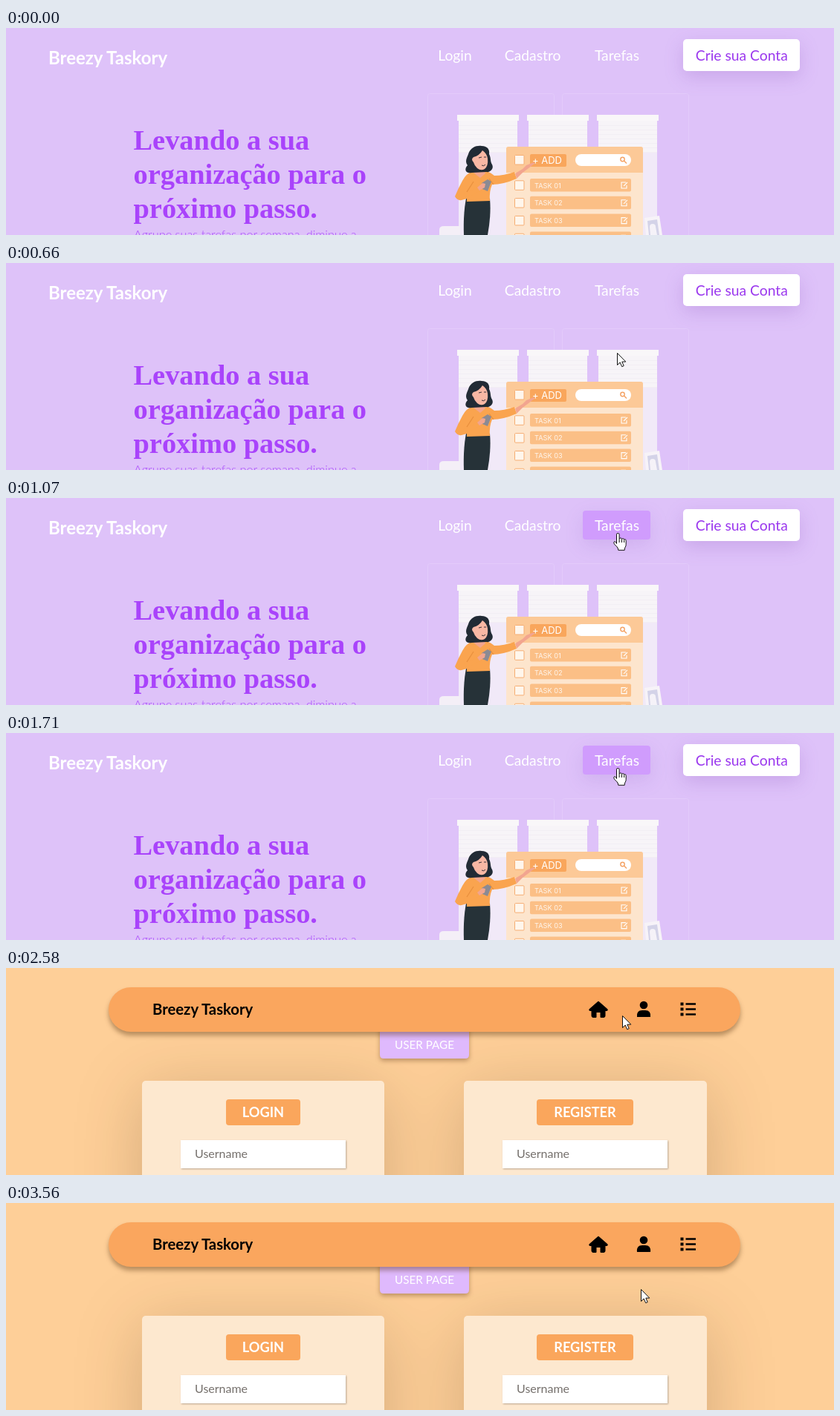
An HTML page that plays this animation: 1114x279 px, repeating every 3630 ms.

```html
<!DOCTYPE html>
<html lang="pt">
<head>
<meta charset="utf-8">
<title>Breezy Taskory</title>
<style>
  html, body { margin: 0; width: 100%; height: 100%; overflow: hidden; background: #dec2f9; }
  svg { display: block; font-family: Lato, sans-serif; }
  .mid { text-anchor: middle; }
  .brand { font-weight: 700; }
  .nav text { font-size: 19.3px; fill: #fff; }
  .nav .cta { fill: #9b38ee; }
  .ctaBox { filter: drop-shadow(0 8px 12px rgba(110, 50, 170, .19)); }
  #hover { filter: drop-shadow(0 8px 12px rgba(110, 50, 170, .12)); }
  .hero { font: 700 38.4px "Liberation Serif", serif; fill: #a943fb; }
  .lead { font-size: 16.3px; font-weight: 300; fill: #a94dfb; }
  .board { font-family: Inter, sans-serif; fill: #fff; }
  .bar { filter: drop-shadow(0 5px 3px rgba(70, 35, 0, .38)); }
  .tab { filter: drop-shadow(0 3px 3px rgba(70, 35, 0, .35)); }
  .cards { filter: drop-shadow(0 14px 44px rgba(50, 30, 10, .21)); }
  .label { font-size: 18.2px; font-weight: 700; fill: #fff; }
  .field { filter: drop-shadow(1px 1px 1px rgba(60, 40, 20, .35)); }
  .hint { font-size: 16px; fill: #75706c; }
</style>
</head>
<body>
<svg width="1114" height="279" viewBox="0 0 1114 279">
  <g id="home">
    <rect width="1114" height="279" fill="#dec2f9"/>
    <text class="brand" x="57" y="49" font-size="24" fill="#fff">Breezy Taskory</text>
    <g class="nav">
      <rect id="hover" x="776" y="17" width="91" height="39" rx="4" fill="#d09cfd"/>
      <rect class="ctaBox" x="911" y="15" width="157" height="43" rx="5" fill="#fff"/>
      <text class="mid" x="604" y="44">Login</text>
      <text class="mid" x="708.7" y="44">Cadastro</text>
      <text class="mid" x="822" y="44">Tarefas</text>
      <text class="mid cta" x="989.8" y="44">Crie sua Conta</text>
    </g>
    <g class="hero">
      <text x="171.5" y="164">Levando a sua</text>
      <text x="171.5" y="210">organização para o</text>
      <text x="171.5" y="256">próximo passo.</text>
    </g>
    <text class="lead" x="172" y="283.5">Agrupe suas tarefas por semana, diminue a</text>

    <g fill="none" stroke="#e3cbfa">
      <rect x="567.5" y="88.5" width="170" height="220" rx="3"/>
      <rect x="748.5" y="88.5" width="170" height="220" rx="3"/>
    </g>
    <g id="blinds"></g>
    <path d="M583 279v-7q0-5 6-5h22v12z" fill="#f4eff7"/>
    <path d="M859 256l20-3 4 26h-22z" fill="#f7f3f8"/>
    <path d="M863 260l13-2 3 21h-14z" fill="#d4d3e8"/>
    <path d="M866 268a4 4 0 1 1 8 0l2 11h-9z" fill="#f5f2f8"/>

    <g class="board" id="board">
      <rect x="673" y="160" width="184" height="130" rx="3" fill="#fde5cd"/>
      <path d="M673 195v-32q0-3 3-3h178q3 0 3 3v32z" fill="#fcc997"/>
      <rect x="705" y="170" width="49" height="17" rx="2" fill="#f9a65c"/>
      <text x="708" y="183" font-size="13">+ ADD</text>
      <rect x="766" y="170" width="75" height="16" rx="8" fill="#fff"/>
      <g fill="none" stroke="#f4a264" stroke-width="1.4">
        <circle cx="829.5" cy="177" r="2.7"/><path d="M831.5 179l3.5 3.5"/>
      </g>
    </g>

    <g id="woman">
      <path d="M619 230q-4 20-3 49h32q5-27 3-49z" fill="#263238"/>
      <path d="M628 193q-9 3-14 13-6 11-10 21 3 6 9 5l7-2v4l31-1q-1-13 3-22 15 0 33-8l-3-9q-14 5-27 5-7-6-15-7z" fill="#faa44f"/>
      <path d="M611 227l24-13 5 4-14 8q-9 4-16 5z" fill="#faa44f"/>
      <path d="M620 221l9-14M656 211l-6-8" fill="none" stroke="#e88f3d" stroke-width="1.2"/>
      <path d="M685 196l10-6 5-5 10-4 2 1-9 7-8 6-8 8z" fill="#f2a58f"/>
      <path d="M630 187h11l4 9-7 6-9-7z" fill="#f2a58f"/>
      <path d="M640 209l8-5 5 3-5 13-7-3z" fill="#8b8a93"/>
      <path d="M634 215l7-6 4 1-1 5-7 4z" fill="#f2a58f"/>
      <path d="M622 170c3-10 12-12 18-11 8 0 11 5 10 11 3 6 1 9 4 14 3 6-3 11-8 10l-19 1c-9 2-11-5-6-10-4-5-1-10 1-15z" fill="#222b35"/>
      <path d="M629 174q8-2 12-9 6 4 7 11 1 10-4 14-5 3-10-1-4-4-5-8-4-4 0-7z" fill="#f8b7a4"/>
      <path d="M636 175l4-1M643 174l3 0M640 185q3 2 5-1" fill="none" stroke="#3b3038" stroke-width="1"/>
    </g>
    <circle id="click" cx="821.5" cy="47" r="12.2" fill="#ff0" fill-opacity=".47"/>
  </g>

  <g id="account">
    <rect width="1114" height="279" fill="#fecf98"/>
    <g class="cards" fill="#fde8cf">
      <rect x="183" y="152" width="326" height="420" rx="5"/>
      <rect x="616" y="152" width="327" height="420" rx="5"/>
    </g>
    <path class="tab" d="M503 80h120v37q0 5-5 5h-110q-5 0-5-5z" fill="#dfb9fd"/>
    <rect class="bar" x="138" y="26" width="850" height="60" rx="30" fill="#faa65e"/>
    <text class="brand" x="197" y="63" font-size="20.3">Breezy Taskory</text>
    <text class="mid" x="563" y="109" font-size="15.2" fill="#fff">USER PAGE</text>
    <g id="forms"></g>
    <g id="icons">
      <path d="M797 45l12 10.5q1 2-1 2h-2v7q0 2-2 2h-4v-7h-6v7h-4q-2 0-2-2v-7h-2q-2 0-1-2z" stroke="#000" stroke-linejoin="round"/>
      <circle cx="858" cy="50" r="5.3"/>
      <path d="M849 66q-1-9 7-9h4q8 0 7 9z"/>
      <path d="M914.5 48.5h13.5M914.5 55.5h13.5M914.5 62.5h13.5" stroke="#000" stroke-width="2.6"/>
      <path d="M907.5 48.5h4M907.5 55.5h4M907.5 62.5h4" stroke="#000" stroke-width="4"/>
    </g>
  </g>

  <g id="arrow">
    <path d="M.5 .5v16l3.7-3.5 2.5 5.7 2.5-1.1-2.4-5.5h5z" fill="#fff" stroke="#111"/>
  </g>
  <g id="hand">
    <path d="M4.5 14.5V2.3q0-1.8 1.8-1.8t1.8 1.8V8q.5-1.1 1.7-1.1 1.5 0 1.7 1.6.6-.9 1.6-.8 1.4.1 1.5 1.5.7-.6 1.4-.4 1.2.2 1.2 1.7v5.2q0 2-1.2 3.8-.8 1.3-.8 3.8H6.8q0-2.4-1.7-4.4L1.5 15.2Q.2 13.2 1.1 12.2q1.2-1.1 2.5.4z" fill="#fff" stroke="#111" stroke-linejoin="round"/>
    <path d="M8.1 8v5M11.5 8.5V13M14.6 9.5V13" stroke="#111"/>
  </g>
</svg>
<script>
const $ = id => document.getElementById(id);
const add = (id, markup) => $(id).insertAdjacentHTML('beforeend', markup);
const box = (x, y, w, h, fill, extra = '') =>
  `<rect x="${x}" y="${y}" width="${w}" height="${h}" fill="${fill}" ${extra}/>`;

for (const x of [607, 701, 795]) {
  add('blinds', box(x + 2, 167, 79, 112, '#f1e9f8') +
    box(x + 2, 125, 79, 42, '#f7f4f8') + box(x, 117, 83, 8, '#f9f7f9'));
  for (let y = 131; y < 168; y += 6) add('blinds', box(x + 2, y, 79, 1, '#f2eef4'));
}

const check = y => box(684.5, y, 12.5, 12.5, '#fff6ec', 'rx="1" stroke="#f6ad72"');
add('board', check(171.5));
for (let i = 0; i < 4; i++) {
  const y = 203 + i * 23.8;
  add('board', check(y + 2.8) + box(705, y, 136, 17.5, '#fbbf86', 'rx="2"') +
    `<text x="711" y="${y + 12.5}" font-size="9.2" fill-opacity=".85">TASK 0${i + 1}</text>
     <path d="M834 ${y + 5}h-6v8h7v-4M831 ${y + 10}l5-5" fill="none" stroke="#fff" stroke-width="1.1"/>`);
}

const form = (x, cx, w, label) => add('forms',
  box(cx - w / 2, 177, w, 35, '#faa65c', 'rx="4"') +
  `<text class="label mid" x="${cx}" y="201">${label}</text>` +
  box(x, 232, 222, 38, '#fff', 'class="field"') +
  `<text class="hint" x="${x + 19}" y="256">Username</text>`);
form(235, 346, 100, 'LOGIN');
form(668, 779, 130, 'REGISTER');

// Pointer stops: time, x, y
const LOOP = 3630, STEP = 33;
const stops = [
  [330, 826, 270], [660, 822, 121], [850, 821, 63], [880, 821, 55], [1070, 822, 47],
  [2470, 822, 47], [2560, 828, 62], [2740, 846, 104], [2870, 853, 116], [3559, 853, 116], [3560, 854, 116]
];

function pointer(t) {
  let i = stops.findIndex(s => s[0] > t);
  if (i < 0) return stops[stops.length - 1].slice(1);
  if (i === 0) i = 1;
  const [a, ax, ay] = stops[i - 1], [b, bx, by] = stops[i];
  const k = (t - a) / (b - a);
  return [ax + (bx - ax) * k, ay + (by - ay) * k].map(Math.round);
}

// Hold each pose between pointer updates
function held(t) {
  for (const [from, to] of [[330, 850], [880, 1070], [2470, 2870]])
    if (t >= from && t < to) return from + Math.floor((t - from) / STEP) * STEP;
  return t;
}

const show = (id, on) => $(id).style.display = on ? '' : 'none';

function draw(time) {
  const t = held(time), [x, y] = pointer(t);
  const isHand = t >= 880 && t < 2470;
  show('home', t < 2230);
  show('account', t >= 2230);
  show('icons', t >= 2470);
  show('click', t >= 1550 && t < 1710);
  show('arrow', t >= 330 && !isHand);
  show('hand', isHand);
  $('hover').style.opacity = Math.min(1, Math.max(0, (t - 850) / 220));
  $('arrow').setAttribute('transform', `translate(${x} ${y})`);
  $('hand').setAttribute('transform', `translate(${x - 5} ${y})`);
}

const start = performance.now();
(function tick() {
  draw((performance.now() - start) % LOOP);
  requestAnimationFrame(tick);
})();
</script>
</body>
</html>
```
